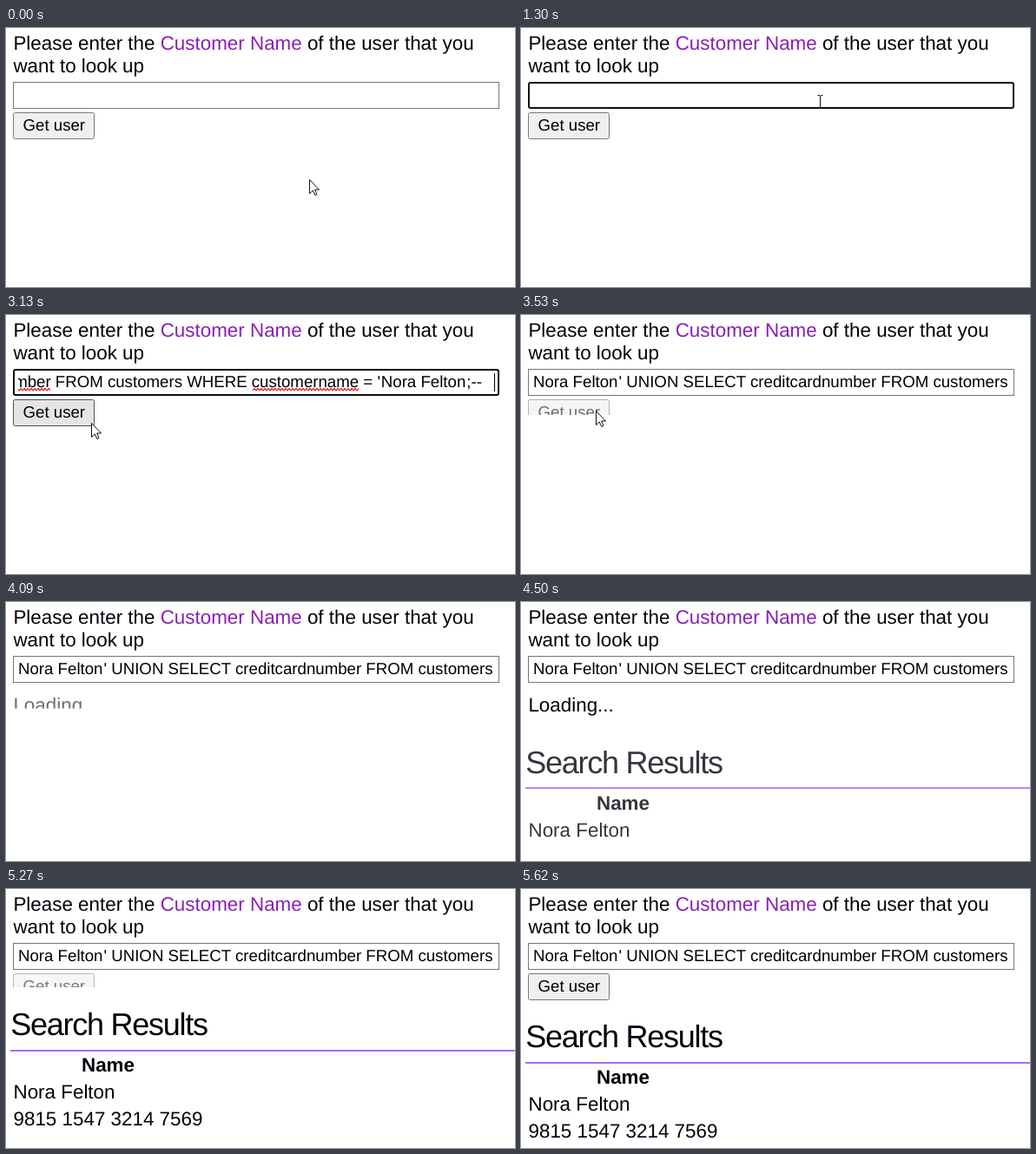
An HTML page for the animation above (6.48 s loop, 586 by 298 pixels).

```html
<!DOCTYPE html>
<html lang="en">
<head>
<meta charset="utf-8">
<title>User lookup</title>
<style>
  html, body { margin: 0; width: 100%; height: 100%; overflow: hidden; background: #fff; }
  svg { display: block; width: 586px; height: 298px; }
  text { font: 22.4px "Liberation Sans", Arial, sans-serif; fill: #06000c; text-rendering: geometricPrecision; white-space: pre; }
  .ctl { font-size: 18.67px; fill: #000; }
  .link { fill: #8a1fb4; }
  .head { font-size: 36px; letter-spacing: -1.25px; }
  .bold { font-weight: 700; text-anchor: middle; }
  .wave { fill: none; stroke: #e8141c; stroke-width: 1.1; }
</style>
</head>
<body>
<svg viewBox="0 0 586 298">
  <defs>
    <clipPath id="fieldClip"><rect x="14" y="64" width="549" height="27"/></clipPath>
    <clipPath id="btnClip"><rect id="btnBox" x="0" y="97" width="586" height="31"/></clipPath>
    <clipPath id="loadClip"><rect id="loadBox" x="0" y="97" width="586" height="44"/></clipPath>
    <clipPath id="resClip"><rect id="resBox" x="0" y="105" width="586" height="163"/></clipPath>
  </defs>

  <text x="8.4" y="25">Please enter the <tspan class="link">Customer Name</tspan> of the user that you</text>
  <text x="8.4" y="51">want to look up</text>

  <rect id="field" fill="#fff"/>
  <g clip-path="url(#fieldClip)">
    <g id="query">
      <text class="ctl" y="83"><tspan x="0">Nora Felton</tspan><tspan x="98.5">' UNION SELECT creditcardnumber FROM customers WHERE customername = '</tspan><tspan x="775.3">Nora Felton</tspan><tspan x="873.8">;--</tspan></text>
      <g id="waves"></g>
    </g>
  </g>
  <rect id="caret" y="67" width="1" height="21"/>

  <g clip-path="url(#btnClip)">
    <g id="btn">
      <rect id="btnFace" x="8.5" y="97.5" width="93" height="30" rx="2"/>
      <text class="ctl" x="19.5" y="118">Get user</text>
    </g>
  </g>

  <g clip-path="url(#loadClip)"><text id="load" x="8.4" y="126">Loading...</text></g>

  <g id="results">
    <g clip-path="url(#resClip)">
      <text class="head" x="5.2" y="153">Search Results</text>
      <rect id="rule" x="5" y="170" width="581" height="2" fill="#a46fee"/>
      <text class="bold" x="117.5" y="195">Name</text>
      <text x="8.5" y="226">Nora Felton</text>
      <text x="8.5" y="257">9815 1547 3214 7569</text>
    </g>
  </g>

  <path id="arrow" d="M.5 .5V16.5L4.3 13L6.8 18.5L9 17.5L6.6 12H11.5Z" fill="#fff" stroke="#111"/>
  <path id="beam" d="M-3 -7.5H-.5M.5 -7.5H3M-3 7.5H-.5M.5 7.5H3M0 -7V7" fill="none" stroke="#111"/>
</svg>
<script>
const LOOP = 6480, STEP = 70;
const $ = id => document.getElementById(id);
const set = (id, attrs) => { for (const k in attrs) $(id).setAttribute(k, attrs[k]); };
const show = (id, on) => { $(id).style.display = on ? '' : 'none'; };

const anchors = [0, 220, 770, 1300, 1830, 2030, 2500, 3200, 3530, 3880, 4500];

// Pointer path: time, x, y
const path = [
  [0, 349, 174], [70, 349, 131], [150, 349, 131], [570, 344, 88],
  [839, 344, 88], [840, 344, 85], [2499, 344, 85], [2500, 303, 97],
  [2710, 230, 118], [2990, 120, 125], [3130, 98, 124], [3200, 90, 114], [3270, 86, 110]
];

const swing = (t, from, to) => {
  const u = Math.min(1, Math.max(0, (t - from) / (to - from)));
  return 0.5 - Math.cos(u * Math.PI) / 2;
};

function snap(t) {
  const a = anchors.filter(v => v <= t).pop();
  return a + Math.floor((t - a) / STEP) * STEP;
}

function pointer(t) {
  const i = path.findIndex(p => p[0] > t);
  if (i < 0) return path[path.length - 1].slice(1);
  const [t0, x0, y0] = path[i - 1], [t1, x1, y1] = path[i];
  const u = (t - t0) / (t1 - t0);
  return [Math.round(x0 + (x1 - x0) * u), Math.round(y0 + (y1 - y0) * u)];
}

function wave(from, to) {
  let d = `M${from} 87`;
  for (let x = from + 2, up = true; x <= to; x += 2, up = !up) d += `L${x} ${up ? 84.5 : 87}`;
  return `<path class="wave" d="${d}"/>`;
}
$('waves').innerHTML = wave(250.6, 396) + wave(627.5, 750.5);

function drawField(t) {
  const focus = t >= 770 && t < 3200;
  const hover = t >= 430 && t < 770;
  const w = focus ? 2 : 1;
  set('field', {
    x: 8 + w / 2, y: 62 + w / 2, width: 560 - w, height: 31 - w, rx: focus ? 2 : 0,
    stroke: focus ? '#101010' : hover ? '#4f4f4f' : '#767676', 'stroke-width': w
  });
  const pasted = t >= 2030;
  show('query', pasted);
  show('waves', focus && t >= 2100);
  set('query', { transform: `translate(${focus ? -343.5 : 14} 0)` });
  const since = t - (pasted ? 2030 : 770);
  set('caret', { x: pasted ? 562 : 14 });
  show('caret', focus && Math.floor(since / 530) % 2 === 0);
}

function drawPanels(t) {
  const btn = t < 4500 ? 1 - swing(t, 3260, 3850) : swing(t, 4920, 5600);
  const load = swing(t, 3870, 4270) - swing(t, 4610, 4910);
  const res = swing(t, 4080, 4680);
  const hover = t >= 3100 && t < 3260;

  set('btnBox', { height: Math.round(31 * btn) });
  set('btn', { opacity: btn });
  set('btnFace', { fill: hover ? '#e5e5e5' : '#efefef', stroke: hover ? '#4f4f4f' : '#767676' });
  set('loadBox', { height: 44 * load });
  set('load', { opacity: load });
  set('resBox', { height: 163 * res });

  // Text and rule each snap to whole pixels
  const shift = 43.5 * load + (t < 4500 ? 0 : 29 * btn);
  const whole = Math.round(shift);
  set('results', { opacity: res, transform: `translate(0 ${whole})` });
  set('rule', { y: Math.round(169.8 + shift) - whole });
}

function drawPointer(t) {
  const [x, y] = pointer(t);
  const beam = t >= 430 && t < 2560;
  show('beam', beam);
  show('arrow', !beam && t < 3880);
  set('beam', { transform: `translate(${x + 0.5} ${y})` });
  set('arrow', { transform: `translate(${x} ${y})` });
}

function draw(ms) {
  const t = snap(ms % LOOP);
  drawField(t);
  drawPanels(t);
  drawPointer(t);
}

const start = performance.now();
function frame() {
  draw(performance.now() - start);
  requestAnimationFrame(frame);
}
frame();
</script>
</body>
</html>
```
